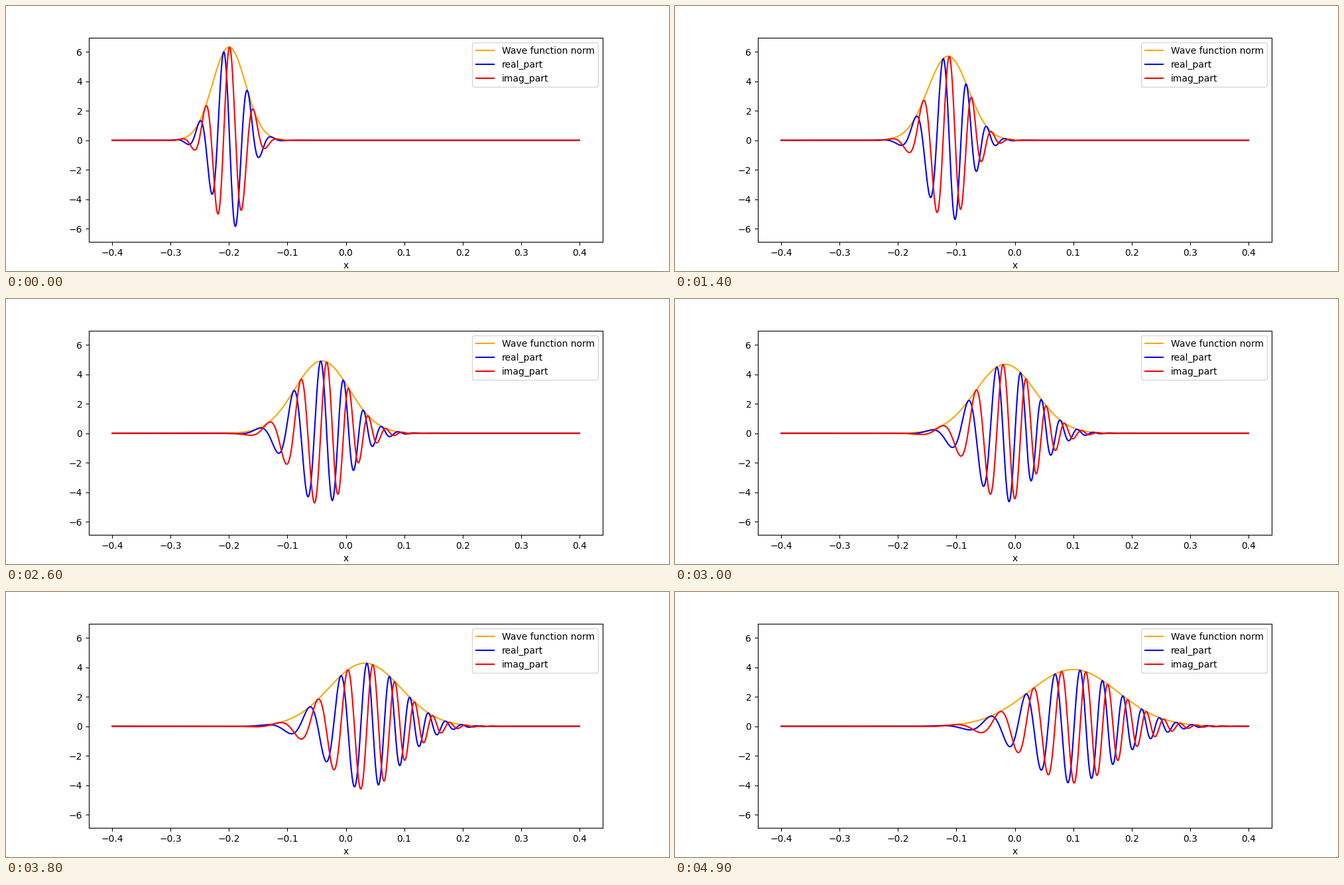
Recreate the animation shown at these times as a matplotlib script. Size 1000 by 400 pixels, loop 5000 ms.

```python
import numpy as np
import matplotlib.pyplot as plt
from matplotlib.animation import FuncAnimation

FRAMES = 50
X0, K, SIGMA, T_END = -0.2, 150.0, 0.02, 0.002

x = np.linspace(-0.4, 0.4, 1000)


def wave_packet(t):
    """Free Gaussian packet with hbar = m = 1, spreading as it travels."""
    width = 2 * SIGMA**2
    spread = 1 + 1j * t / width
    peak = np.sqrt(2) * (np.pi * width) ** -0.25
    envelope = peak / np.sqrt(spread) * np.exp(
        -(x - X0 - K * t) ** 2 / (2 * width * spread))
    return envelope * np.exp(1j * (K * x - K**2 * t / 2))


waves = [wave_packet(t) for t in np.linspace(0, T_END, FRAMES)]

fig, ax = plt.subplots(figsize=(10, 4), dpi=100)
norm_line, = ax.plot([], [], color="orange", label="Wave function norm")
real_line, = ax.plot([], [], color="blue", label="real_part")
imag_line, = ax.plot([], [], color="red", label="imag_part")

low = min(min(w.real.min(), w.imag.min()) for w in waves)
high = max(np.abs(w).max() for w in waves)
pad = 0.05 * (high - low)
ax.set_xlim(-0.44, 0.44)
ax.set_ylim(low - pad, high + pad)
ax.set_xlabel("x")
ax.legend(loc="upper right")


def update(i):
    psi = waves[i]
    norm_line.set_data(x, np.abs(psi))
    real_line.set_data(x, psi.real)
    imag_line.set_data(x, psi.imag)
    return norm_line, real_line, imag_line


anim = FuncAnimation(fig, update, frames=FRAMES, interval=100, repeat=True)
plt.show()
```
